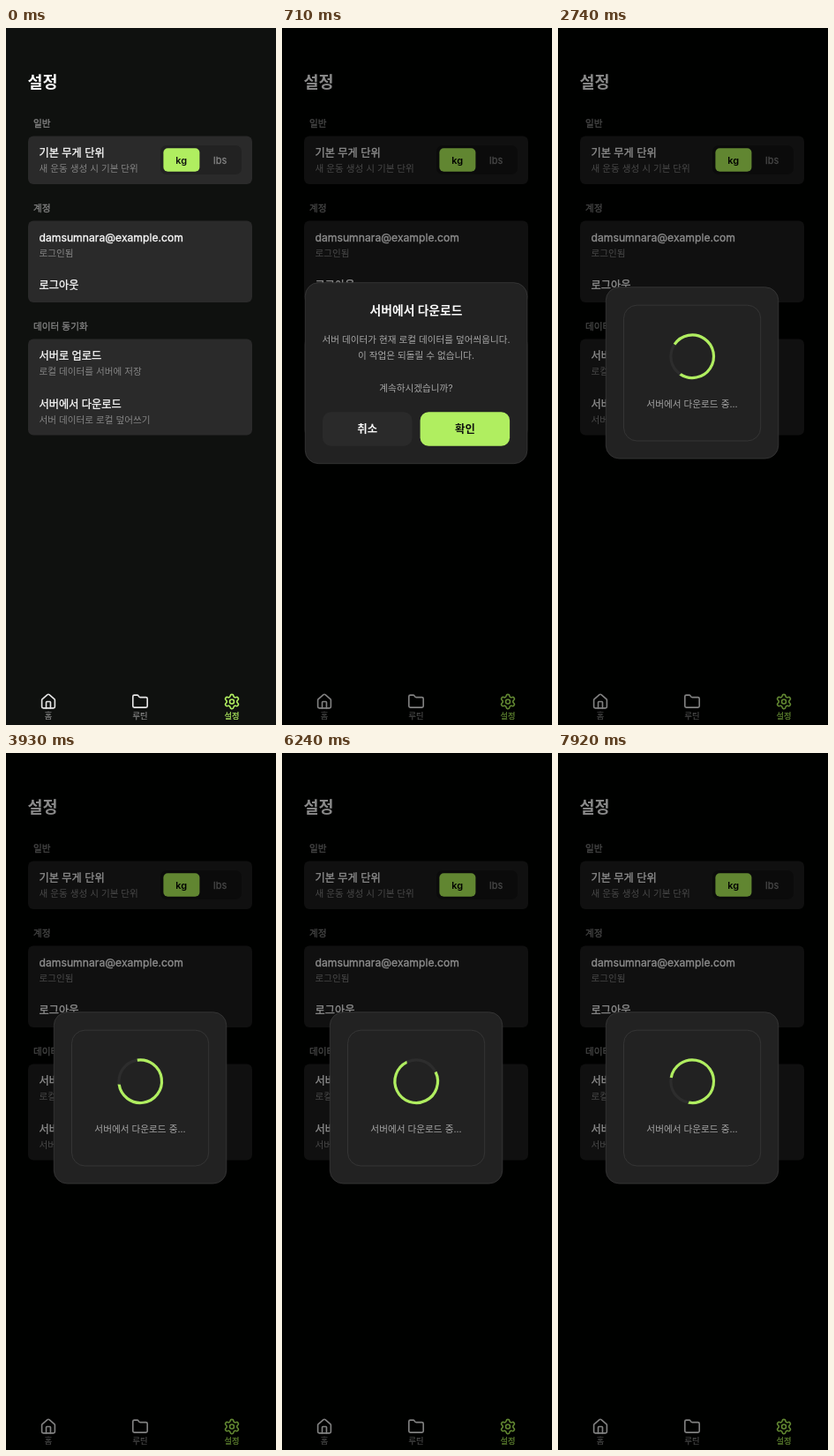
Recreate the animation shown at these times as an HTML page. Size 306x790 px, loop 7.99 s.

```html
<!DOCTYPE html>
<html lang="ko">
<head>
<meta charset="utf-8">
<style>
  html, body { margin: 0; width: 100%; height: 100%; overflow: hidden; background: #000; }
  svg { display: block; width: 306px; height: 790px; }
  text { font-family: Inter, "Noto Sans CJK KR", "Noto Sans CJK", sans-serif; }
  .icon { fill: none; stroke-width: 2; stroke-linecap: round; stroke-linejoin: round; }
  .dim { filter: contrast(1.133) brightness(.53); }
</style>
</head>
<body>
<svg id="stage" viewBox="0 0 306 790"></svg>
<script>
const LOOP = 7990, PRESS = 500, DIALOG = 710, LOADING = 1760, STEP = 70;
const GREEN = '#b0ee60', WHITE = '#fafafa', GRAY = '#858585', SOFT = '#a6a6a6';
const CARD = '#2a2a2a', PANEL = '#222222', LINE = '#3a3a3a', INK = '#10120f';
const REGULAR = 400, MEDIUM = 500, BOLD = 700;

// Text is placed by the vertical centre of its glyphs. Hangul has no medium
// weight installed, so a hairline outline thickens the regular one.
function text(x, cy, size, fill, str, weight = REGULAR, anchor = 'start') {
  const outline = weight === MEDIUM ? `stroke="${fill}" stroke-width="${size * .025}"` : '';
  return `<text x="${x}" y="${cy + size * .37}" font-size="${size}" fill="${fill}" ${outline}
    font-weight="${weight === MEDIUM ? REGULAR : weight}" text-anchor="${anchor}">${str}</text>`;
}
const centered = (x, cy, size, fill, str, weight) => text(x, cy, size, fill, str, weight, 'middle');
const box = (x, y, w, h, r, fill, stroke = 'none') =>
  `<rect x="${x}" y="${y}" width="${w}" height="${h}" rx="${r}" fill="${fill}" stroke="${stroke}" stroke-width=".8"/>`;
const section = (cy, str) => text(31, cy, 10.65, GRAY, str, MEDIUM);
const row = (cy, title, note) =>
  text(37.5, cy, 12.2, WHITE, title, MEDIUM) + (note ? text(37.5, cy + 17.8, 10.6, GRAY, note) : '');
const tab = (x, color, labelColor, label, shape) =>
  `<g class="icon" stroke="${color}" transform="translate(${x} 763.5) scale(.82) translate(-12 -12)">${shape}</g>` +
  centered(x, 780, 9.2, labelColor, label, MEDIUM);

const house = `<path d="M15 21v-8a1 1 0 0 0-1-1h-4a1 1 0 0 0-1 1v8"/>
  <path d="M3 10a2 2 0 0 1 .709-1.528l7-5.999a2 2 0 0 1 2.582 0l7 5.999A2 2 0 0 1 21 10v9a2 2 0 0 1-2 2H5a2 2 0 0 1-2-2z"/>`;
const folder = `<path d="M20 20a2 2 0 0 0 2-2V8a2 2 0 0 0-2-2h-7.9a2 2 0 0 1-1.69-.9L9.6 3.9A2 2 0 0 0 7.93 3H4a2 2 0 0 0-2 2v13a2 2 0 0 0 2 2Z"/>`;
const gear = `<path d="M9.671 4.136a2.34 2.34 0 0 1 4.659 0 2.34 2.34 0 0 0 3.319 1.915 2.34 2.34 0 0 1 2.33 4.033 2.34 2.34 0 0 0 0 3.831 2.34 2.34 0 0 1-2.33 4.033 2.34 2.34 0 0 0-3.319 1.915 2.34 2.34 0 0 1-4.659 0 2.34 2.34 0 0 0-3.32-1.915 2.34 2.34 0 0 1-2.33-4.033 2.34 2.34 0 0 0 0-3.831A2.34 2.34 0 0 1 6.35 6.051a2.34 2.34 0 0 0 3.319-1.915"/>
  <circle cx="12" cy="12" r="3"/>`;

const settings = box(0, 0, 306, 790, 0, '#0f110f') +
  text(24.5, 61.3, 18.5, WHITE, '설정', BOLD) +
  section(108, '일반') +
  box(25, 122.5, 254, 54.5, 6.2, CARD) +
  row(141, '기본 무게 단위', '새 운동 생성 시 기본 단위') +
  box(175, 133, 92, 33, 6.5, PANEL) +
  box(178.4, 136.2, 41, 26.6, 5, GREEN) +
  centered(198.7, 149.5, 11, INK, 'kg', 600) +
  centered(242.7, 149.5, 11, GRAY, 'lbs', MEDIUM) +
  section(204, '계정') +
  box(25, 218.5, 254, 92.5, 6.2, CARD) +
  row(237.5, 'damsumnara@example.com', '로그인됨') +
  row(291.7, '로그아웃') +
  section(337.8, '데이터 동기화') +
  box(25, 352.5, 254, 109, 6.2, CARD) +
  row(371.7, '서버로 업로드', '로컬 데이터를 서버에 저장') +
  `<g id="download">${row(426, '서버에서 다운로드', '서버 데이터로 로컬 덮어쓰기')}</g>` +
  tab(48, '#e6e6e6', GRAY, '홈', house) +
  tab(152, '#e6e6e6', GRAY, '루틴', folder) +
  tab(256, GREEN, GREEN, '설정', gear);

const dialog = box(26.3, 288.7, 251.6, 205, 15, PANEL, LINE) +
  centered(152, 319.5, 13.8, WHITE, '서버에서 다운로드', BOLD) +
  centered(152, 352.7, 10.6, SOFT, '서버 데이터가 현재 로컬 데이터를 덮어씌웁니다.') +
  centered(152, 371, 10.6, SOFT, '이 작업은 되돌릴 수 없습니다.') +
  centered(152, 407.7, 10.6, SOFT, '계속하시겠습니까?') +
  box(46, 435.3, 101.5, 38.5, 9.5, CARD) +
  box(156.6, 435.3, 101.5, 38.5, 9.5, GREEN) +
  centered(96.7, 454.5, 12.4, WHITE, '취소', 600) +
  centered(207.4, 454.5, 12.4, INK, '확인', 600);

const ring = (color, extra = '') =>
  `<circle r="24.3" fill="none" stroke="${color}" stroke-width="3.2" ${extra}/>`;
const loading = box(54.3, 293.8, 195.5, 194.2, 15, PANEL, LINE) +
  box(74.5, 314.2, 155.2, 153.8, 15, PANEL, LINE) +
  `<g transform="translate(152.2 372.2)">${ring('#2d2d2d')}
    ${ring(GREEN, 'id="arc" pathLength="4" stroke-dasharray="3 1"')}</g>` +
  centered(152, 426.3, 10.65, SOFT, '서버에서 다운로드 중...');

const byId = id => document.getElementById(id);
byId('stage').innerHTML =
  `<g id="settings">${settings}</g><g id="dialog">${dialog}</g><g id="loading">${loading}</g>`;

const show = (id, visible) => byId(id).setAttribute('display', visible ? 'inline' : 'none');
const start = performance.now();

function draw(now) {
  const t = Math.max(0, now - start) % LOOP;
  byId('settings').classList.toggle('dim', t >= DIALOG);
  byId('download').setAttribute('opacity', t >= PRESS && t < DIALOG ? .8 : 1);
  show('dialog', t >= DIALOG && t < LOADING);
  show('loading', t >= LOADING);
  const steps = Math.floor((t - LOADING) / STEP);
  byId('arc').setAttribute('transform', `rotate(${238 + 24 * steps})`);
  requestAnimationFrame(draw);
}
draw(start);
</script>
</body>
</html>
```
